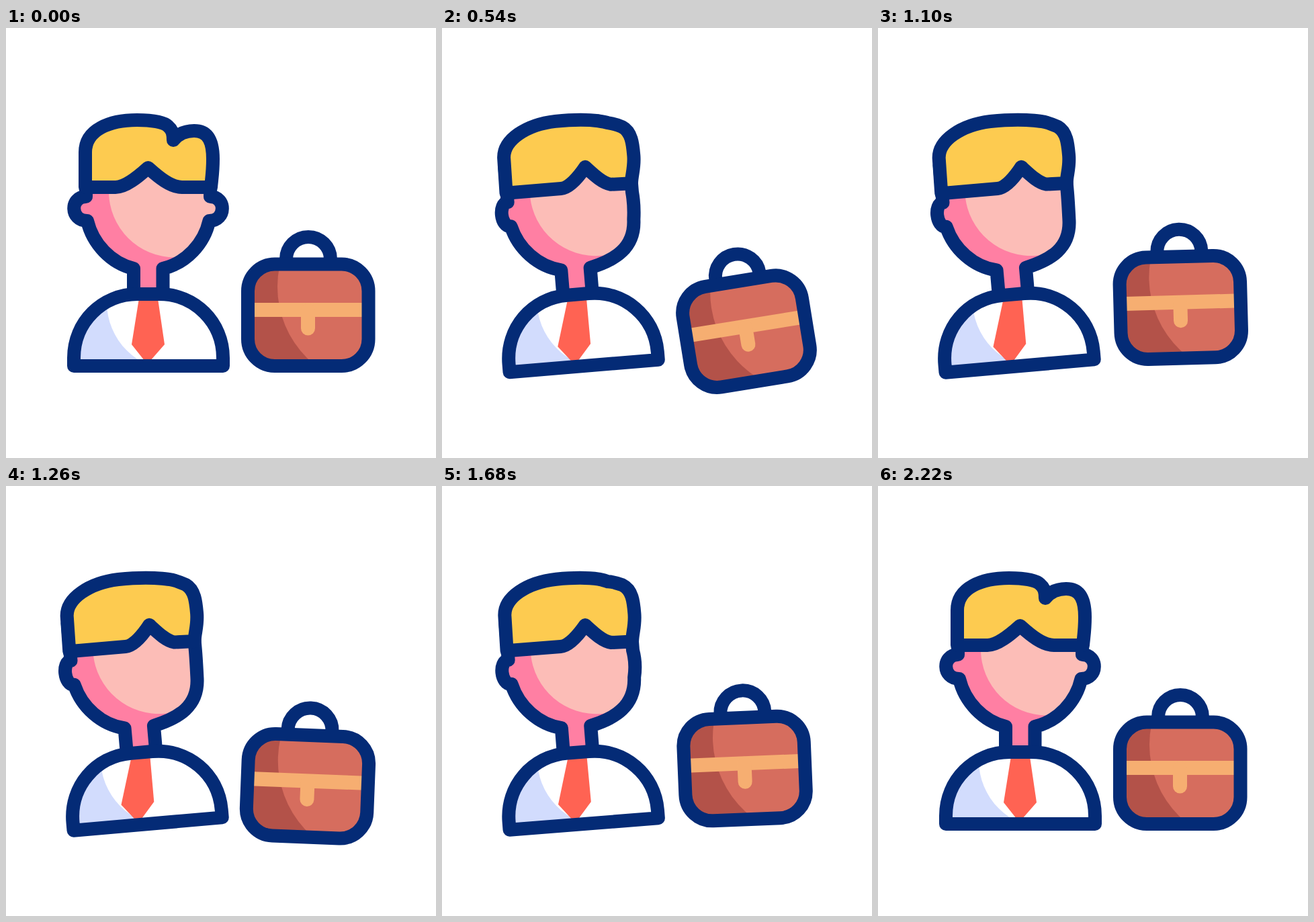
These frames come from a looping animation (640 by 640 pixels, 2.4 s). An HTML page:

```html
<!DOCTYPE html>
<html lang="en">
<head>
<meta charset="utf-8">
<title>Businessman and briefcase</title>
<style>
  html, body { margin: 0; width: 100%; height: 100%; overflow: hidden; background: #fff; }
  svg { display: block; width: 100%; height: 100%; }
  .line { fill: none; stroke: #042b76; stroke-width: 20; stroke-linejoin: round; stroke-linecap: round; }
</style>
</head>
<body>
<svg viewBox="0 0 640 640">
  <defs>
    <clipPath id="faceClip"><path data-shape="face"/></clipPath>
    <clipPath id="bustClip"><path data-shape="bust"/></clipPath>
    <clipPath id="bagClip"><rect x="360" y="351.5" width="179.5" height="151.5" rx="40"/></clipPath>
  </defs>

  <g id="person">
    <g clip-path="url(#faceClip)">
      <path data-shape="face" fill="#ff7fa3"/>
      <circle cx="251.5" cy="243" r="98.5" fill="#fcbdb7"/>
    </g>
    <path data-shape="face" class="line"/>
    <path data-shape="hair" fill="#fdcb50"/>
    <path data-shape="hair" class="line"/>
    <g clip-path="url(#bustClip)">
      <path data-shape="bust" fill="#d2dcfd"/>
      <circle cx="252" cy="408" r="102" fill="#fff"/>
      <rect x="252" y="390" width="90" height="120" fill="#fff"/>
      <path data-shape="tie" fill="#ff6353"/>
    </g>
    <path data-shape="bust" class="line"/>
  </g>

  <g id="bag">
    <path class="line" d="M417 346V344A33 33 0 0 1 483 344V346"/>
    <g clip-path="url(#bagClip)">
      <rect x="355" y="346" width="190" height="162" fill="#b35249"/>
      <circle cx="554" cy="385" r="150" fill="#d66d5e"/>
      <rect x="355" y="409" width="190" height="21" fill="#f6ae71"/>
      <path d="M449.5 420V447" fill="none" stroke="#f6ae71" stroke-width="21" stroke-linecap="round"/>
    </g>
    <rect class="line" x="360" y="351.5" width="179.5" height="151.5" rx="40"/>
  </g>
</svg>
<script>
const LOOP = 2400, START = 200, STEP = 400;

// Each shape: facing front, then turned. Both share one command structure.
const shapes = {
  face: [
    `M119 195 L119 251 C95 251 95 287 121 287 C129 321 156 350 190 358 L190 400 L233.5 400
     L233.5 358 C268 350 295 321 302.5 287 C328 287 328 251 304 251 L305 195 Z`,
    `M119 195 L119 251 C105.5 251 105.5 287 121 287 C129 321 156 350 190 358 L190 400 L233.5 400
     L233.5 358 C271 350 303 335 304 292 C304.5 278 305 265 305 251 L305 195 Z`
  ],
  hair: [
    `M118 237 L118 185 C118 151 155 137 195 137 C216 137 235 140 241 146 C248 152 249 158 249 167
     C257 157 268 153 280 153 C303 153 308 172 308 195 C308 215 306 225 305 237
     L262 237 C245 237 227 222 211.5 208 C196 222 178 237 163 237 Z`,
    `M118 237 L119 184 C121 158 156 138 200 136.5 C228 136 252 138.5 265 141 C270 142 275 143 279 144
     C285 146 292 149 299 153 C312 162 312 180 312 197 C312 215 306 226 305 238
     L275 237 C263 234 251 220 240 208 C229 222 214 237 202 237 Z`
  ],
  bust: ["M101 503 L101 491 C101 438 143 396 196 396 L228 396 C281 396 323 438 323 491 L323 503 Z"],
  tie: [
    "M199 396 L225 396 L236 471 L215 495 L206 495 L187 471 Z",
    "M198 396 L224 396 L224 471 L203 495 L194 495 L175 471 Z"
  ]
};

// Values at START and every STEP after it.
const bagDrop = [0, 26, -19.2, 33.8, -17, 0];
const bagTilt = [0, -9.7, -2.5, 4, -4, 0];

const person = document.getElementById("person");
const bag = document.getElementById("bag");
const paths = [...document.querySelectorAll("[data-shape]")];

const mix = (a, b, p) => a + (b - a) * p;
const ease = p => (1 - Math.cos(Math.PI * p)) / 2;

// Eased value of evenly spaced keys at time t.
function sample(keys, t, start = START) {
  const last = keys.length - 1;
  const pos = Math.min(Math.max((t - start) / STEP, 0), last);
  const i = Math.min(Math.floor(pos), last - 1);
  return mix(keys[i], keys[i + 1], ease(pos - i));
}

function morph([from, to], p) {
  if (!to) return from;
  const ends = to.match(/[\d.]+/g);
  let i = 0;
  return from.replace(/[\d.]+/g, n => mix(+n, +ends[i++], p).toFixed(2));
}

function turnAt(t) {
  return t < 1200 ? sample([0, 1], t) : sample([1, 0], t, 1600);
}

function draw(t) {
  const turn = turnAt(t);
  for (const path of paths) path.setAttribute("d", morph(shapes[path.dataset.shape], turn));
  person.setAttribute("transform", `rotate(${-5 * turn} 212 513)`);
  bag.setAttribute("transform", `translate(0 ${sample(bagDrop, t)}) rotate(${sample(bagTilt, t)} 450 407)`);
}

const begin = performance.now();
function tick() {
  draw((performance.now() - begin) % LOOP);
  requestAnimationFrame(tick);
}
draw(0);
requestAnimationFrame(tick);
</script>
</body>
</html>
```
